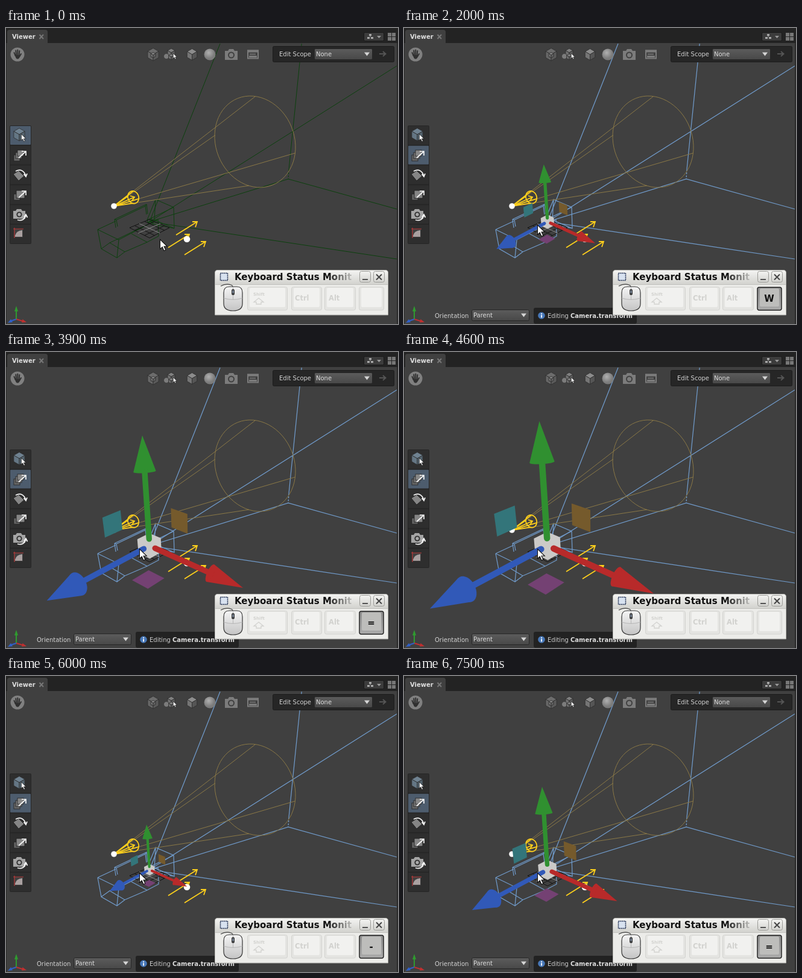
These frames come from a looping animation (650x492 px, 8 s). An HTML page:

```html
<!DOCTYPE html>
<html>
<head>
<meta charset="utf-8">
<style>
html, body { margin: 0; width: 100%; height: 100%; overflow: hidden; background: #404040; }
svg { display: block; width: 650px; height: 492px; font: 10px "DejaVu Sans", sans-serif; }
.b { font-weight: bold; }
</style>
</head>
<body>
<svg id="stage" viewBox="0 0 650 492"></svg>
<script>
const LOOP = 8000;
const f1 = v => v.toFixed(2);
const line = (pts, extra = '') => `<path d="M${pts}" fill="none" ${extra}/>`;
const shape = (pts, fill, extra = '') => `<path d="M${pts}Z" fill="${fill}" ${extra}/>`;
const rect = (x, y, w, h, fill, rx = 0, extra = '') =>
  `<rect x="${x}" y="${y}" width="${w}" height="${h}" rx="${rx}" fill="${fill}" ${extra}/>`;
const text = (x, y, s, fill, extra = '') => `<text x="${x}" y="${y}" fill="${fill}" ${extra}>${s}</text>`;
const disc = (x, y, r, fill, extra = '') => `<circle cx="${x}" cy="${y}" r="${r}" fill="${fill}" ${extra}/>`;
const grad = (id, a, b) =>
  `<linearGradient id="${id}" x2="0" y2="1"><stop stop-color="${a}"/><stop offset="1" stop-color="${b}"/></linearGradient>`;
const at = (x, y, s) => `<g transform="translate(${x} ${y})">${s}</g>`;
const pointer = '<path d="M.5 .5V16.5L4.2 13L7 19.3L9.8 18L7 12H12.3Z" fill="#fff" stroke="#111" stroke-width="1.1"/>';

function cube(x, y, r, top, left, right) {
  const w = r * .87, h = r / 2, k = 'stroke="#2c2c2c" stroke-width=".8"';
  return at(x, y,
    shape(`0 ${-r}L${w} ${-h}L0 0L${-w} ${-h}`, top, k) +
    shape(`${-w} ${-h}L0 0V${r}L${-w} ${h}`, left, k) +
    shape(`${w} ${-h}L0 0V${r}L${w} ${h}`, right, k));
}

// ---- scene ----
function room() {
  return line('238 322L355 26M238 322L648 63M238 322L648 384M238 322L468 251L648 301M490.200 26L469 235') +
    line('469 235L468 251', 'stroke-dasharray="3 2"') +
    // body
    line('152 335L158 367L184 382L197 372L172 357L158 367M152 335L187 352L184 382M152 335L182 321' +
      'M187 352L252 318L253 346L234 356L197 372M172 357L228 330M234 356L208 342') +
    // handle
    line('180 318L233 293L235 309M180 318L182 332M183 319L231 296L233 310M183 319L185 330M180 318L183 319M233 293L231 296') +
    // hood
    line('248 285L278 298L279 333L246 319ZM248 285L234 319M278 298L241 316M279 333L244 326M246 319L235 323M234 319L241 316L244 326L235 323Z');
}

function grid() {
  let d = '';
  for (let i = 0; i <= 4; i++) {
    const k = i / 4;
    if (i === 2) continue;
    d += `M${205 + 33 * k} ${332 - 14 * k}L${238 + 33 * k} ${349 - 17 * k}`;
    d += `M${205 + 33 * k} ${332 + 17 * k}L${238 + 33 * k} ${318 + 14 * k}`;
  }
  return line(d.slice(1), 'stroke="#111" stroke-width="1"') +
    line('221 325L255 341M219 341L256 325', 'stroke="#8a8a8a" stroke-width="1"');
}

const disk = '<ellipse rx="77.6" ry="65.2" transform="translate(234 -107) rotate(68.3)" fill="none" vector-effect="non-scaling-stroke"/>';
const rays = 'M0 0L234 -182M0 0L168 -118M0 0L300 -88M0 0L224 -34';
const cone = (k, style) => `<g transform="translate(179 296) scale(${k})" ${style}>${disk}` +
  `<path d="${rays}" vector-effect="non-scaling-stroke"/></g>`;

function lights() {
  const y = 'stroke="#ffcf1c" stroke-width="1.8"';
  const ray = (x, y2) => `M${x} ${y2}l35 -22m-8 0h8l-3 9`;
  return cone(1, 'stroke="#8a7846" stroke-width="1"') + cone(.137, y) +
    line('179 296L213 281M206 279L213 281L209 287', y) +
    disc(179, 296, 4.8, '#fff') +
    line((ray(282, 344) + ray(269, 365) + ray(296, 377)).slice(1), y) +
    disc(300, 351, 5.3, '#fff');
}

// ---- transform handles, in perspective ----
const AXES = [[14.42, 6.51, .01806], [-1.156, -17.64, .0148], [-14.965, 8.01, .02326]];
function project(v) {
  const sum = i => AXES.reduce((s, a, n) => s + a[i] * v[n], 0);
  const w = 1 - sum(2);
  return [238 + sum(0) / w, 322 + sum(1) / w];
}
const poly = (t, pts, fill) =>
  shape(pts.map(p => project(p.map(c => c * t)).map(f1).join(' ')).join('L'), fill);

function plane(t, skip, fill) {
  const a = .28, b = .455;
  const pts = [[a, a], [a, b], [b, b], [b, a]].map(p => { const q = [...p]; q.splice(skip, 0, 0); return q; });
  return poly(t, pts, fill);
}

function arrow(t, axis, fill, neck, radius, squash) {
  const on = k => project([0, 1, 2].map(i => i === axis ? k * t : 0));
  const tip = on(1), base = on(neck), start = on(.07);
  const dx = tip[0] - base[0], dy = tip[1] - base[1];
  const len = Math.hypot(dx, dy), r = radius * t, m = r * squash;
  const a = len - m * m / len, h = r * Math.sqrt(1 - m * m / len / len);
  return line(`${start.map(f1)}L${base.map(f1)}`, `stroke="${fill}" stroke-width="${f1(t * 1.05)}" stroke-linecap="round"`) +
    `<g fill="${fill}" transform="translate(${tip.map(f1)}) rotate(${f1(Math.atan2(dy, dx) * 180 / Math.PI)})">` +
    `<path d="M0 0L${f1(-a)} ${f1(h)}V${f1(-h)}Z"/><ellipse cx="${f1(-len)}" rx="${f1(m)}" ry="${f1(r)}"/></g>`;
}

function handles(t) {
  const c = .073;
  const hex = [[-c, c, -c], [c, c, -c], [c, -c, -c], [c, -c, c], [-c, -c, c], [-c, c, c]];
  return plane(t, 0, '#33757a') + plane(t, 2, '#755a2c') + plane(t, 1, '#744173') +
    poly(t, hex, '#cbcac8') +
    arrow(t, 1, '#309030', .705, 2.07, .15) +
    arrow(t, 0, '#b82a2a', .69, 1.75, .35) +
    arrow(t, 2, '#3159b8', .745, 2.3, .66);
}

// ---- interface ----
function header() {
  return rect(0, 0, 650, 25, '#232323') + rect(0, 25, 1, 467, '#2a2a2a') + rect(648, 25, 2, 467, '#2a2a2a') +
    shape('2 26V7Q2 3 6 3H65Q69 3 69 7V26', '#404040') +
    text(10, 18, 'Viewer', '#dedede', 'class="b"') +
    line('55.500 11L62 18M62 11L55.500 18', 'stroke="#777" stroke-width="2"') +
    rect(593.5, 7.5, 33, 14, '#3c3c3c', 2, 'stroke="#191919"') +
    rect(602, 10, 4, 3, '#aaa') + rect(599, 15, 4, 3, '#aaa') + rect(605, 15, 4, 3, '#aaa') +
    line('604 13V15', 'stroke="#aaa"') + shape('615 13H622L618.500 17', '#999') +
    [633, 640].map(x => rect(x, 8, 6, 6, '#777') + rect(x, 15, 6, 6, '#777')).join('');
}

function topIcons() {
  const g = '#7c7c7c', d = '#404040';
  const finger = (x, y, x2) => `M${x} ${y}L${x2} 46`;
  return disc(19, 44, 11.5, '#808080') +
    line((finger(13.5, 41, 15.5) + finger(16.3, 37.5, 17) + finger(19.3, 36.5, 19.3) + finger(22.3, 38, 21.6) + 'M25 43L22 48').slice(1),
      'stroke="#303030" stroke-width="2" stroke-linecap="round"') +
    shape('14.500 45H23L22 50Q19 53 16.500 50', '#303030') +
    cube(244, 44, 10.5, '#6c6c6c', '#666', '#5a5a5a') + rect(240, 42, 7, 7, '#464646') + cube(244, 45, 4.5, '#858585', '#777', '#666') +
    cube(274, 41, 7, '#808080', '#707070', '#5c5c5c') + disc(266, 47, 4.5, g, `stroke="${d}"`) + cube(274, 48, 5, '#808080', '#707070', '#606060') +
    at(277, 42, `<g transform="scale(.52)">${pointer}</g>`) +
    cube(308.500, 44, 9.5, '#8c8c8c', '#757575', '#555') +
    disc(338, 44, 9.5, 'url(#ball)') +
    shape('363 38H368L370 35H377L379 38H384V53H363', g) + disc(373.500, 45, 5.5, d) + disc(373.500, 45, 3.5, g) +
    rect(401, 37.5, 17, 13, d, 0, `stroke="${g}" stroke-width="2"`) + rect(400, 36.5, 19, 4, g) +
    rect(403, 46, 13, 3, g) + line('404 43.500H414', `stroke="${g}" stroke-width="1.5"`) +
    rect(442.5, 30.5, 201, 26, '#262626', 2, 'stroke="#1c1c1c"') +
    text(453, 47, 'Edit Scope', '#d2d2d2') + combo(511, 34, 97, 'None') +
    line('619 43H629M625 39L629.500 43L625 47', 'stroke="#555" stroke-width="2"');
}

function combo(x, y, w, label) {
  return rect(x + .5, y + .5, w - 1, 18, 'url(#combo)', 2, 'stroke="#272727"') +
    text(x + 3, y + 13, label, '#dedede') + shape(`${x + w - 14} ${y + 6.5}h9l-4.500 6`, '#d5d5d5');
}

function tools(active) {
  let s = rect(6, 162, 36, 197, '#262626', 2);
  for (let i = 0; i < 6; i++) s += rect(7, 163 + 32.8 * i, 34, 31, i === active ? '#4d5c6d' : '#2e2e2e', 1);
  const box = (x, y, c) => rect(x, y, 10, 10, c, 0, 'stroke="#222" stroke-width=".8"');
  const dart = (x, y) => line(`${x} ${y}l12 -11m-7 0h7v7`, 'stroke="#f5f5f5" stroke-width="1.7"');
  const curve = d => line(d, 'stroke="#f5f5f5" stroke-width="1.8"');
  return s +
    cube(22, 177, 10.5, '#6f8291', '#647684', '#55646f') + at(25, 176, `<g transform="scale(.66)">${pointer}</g>`) +
    box(13, 211, '#666') + box(16, 207, '#777') + box(19, 203, '#888') + dart(21, 216) +
    shape('12 243L21 237L30 246L21 254', '#858585', 'stroke="#222"') + curve('16 238Q28 232 33 246M29.500 243L33 247L35 242') +
    box(13, 276, '#666') + rect(17, 270, 14, 13, '#858585', 0, 'stroke="#222"') + dart(21, 282) +
    shape('12 304H16L18 301H25L27 304H32V317H12', '#a5a5a5') + disc(22, 310, 4.6, '#2e2e2e') + disc(22, 310, 2.7, '#aaa') +
    curve('19 319Q30 322 33 311M30 314L33 310L35.500 315') +
    rect(14, 334, 14, 14, '#3f3f3f') + shape('15 347V345Q17 337 27 336V347', '#a9a0a0') +
    line('12 334H29M14 332V349', 'stroke="#b83a3a" stroke-width="1.2"');
}

function compass() {
  return line('17 484V470', 'stroke="#2f9a2f" stroke-width="2"') + line('17 484L27 487', 'stroke="#c03030" stroke-width="2"') +
    line('17 484L8 487', 'stroke="#3060c8" stroke-width="2"') +
    shape('17 462L20 471H14', '#2f9a2f') + shape('34 489L26 489.500L27.500 484', '#c03030') + shape('3 490L8 484L11 489', '#3060c8');
}

function status() {
  return text(51, 482, 'Orientation', '#d2d2d2') + combo(112, 468, 96, 'Parent') +
    rect(215, 465, 171, 26.500, '#222', 3) +
    disc(228, 478, 5.8, '#4878b8') + rect(227.2, 477, 1.8, 4.500, '#fff') + rect(227.2, 474.200, 1.8, 1.8, '#fff') +
    text(238, 482, 'Editing', '#ccc') + text(276, 482, 'Camera.transform', '#ddd', 'class="b"');
}

function monitor() {
  const key = (x, w) => rect(x + .5, 430.5, w, 38.5, '#e4e4e1', 3, 'stroke="#d3d3d0"') + rect(x + 4, 432, w - 7, 32, '#f1f1ef', 2);
  const btn = x => rect(x + .5, 404.5, 18, 18, 'url(#bar)', 3, 'stroke="#9a9a96"');
  const pale = '#d2d2cf';
  return shape('346.500 477V407Q346.500 402.500 351 402.500H629Q633.500 402.500 633.500 407V477', '#ecece9', 'stroke="#b5b5b1"') +
    shape('347 426V407Q347 403 351 403H629Q633 403 633 407V426', 'url(#bar)') + rect(347, 426, 286, 1, '#c2c2be') +
    rect(355.5, 407.5, 12, 12, '#d8e2f0', 0, 'stroke="#16264a" stroke-width="1.5" stroke-dasharray="2 1"') +
    text(379, 419, 'Keyboard Status Monit', 'url(#fade)', 'class="b" font-size="15"') +
    btn(586) + btn(609) + line('591 418H600', 'stroke="#444" stroke-width="1.8"') +
    line('614 409.500L623 418.500M623 409.500L614 418.500', 'stroke="#444" stroke-width="2"') +
    key(400, 66) + key(473, 50) + key(528, 51) + key(585, 41) +
    text(410, 445, 'Shift', pale, 'class="b" font-size="7"') +
    line('419 449L427 455.500H423V459H415V455.500H411Z', `stroke="${pale}" stroke-width="1.3"`) +
    text(479, 453, 'Ctrl', pale, 'class="b" font-size="11.500"') + text(535, 453, 'Alt', pale, 'class="b" font-size="11.500"');
}

const mouseBody = '361 440Q361 430 370 430H383Q392 430 392 440V458Q392 470 376.500 470Q361 470 361 458';
function mouse(down) {
  return line('356 429Q365 424 373 427Q376 428 376.500 431', 'stroke="#444" stroke-width="1.3"') +
    shape(mouseBody, 'url(#shell)', 'stroke="#333" stroke-width="1.2"') +
    (down ? shape('362 440Q362 431 370 431H376V451H362', '#555') + shape('362 451H376V467Q362 466 362 456', '#aaa') : '') +
    line('361 449Q376 454 392 449M376.500 430V451', 'stroke="#b5b5b5" stroke-width="1"') +
    rect(374, 434, 5, 10, '#3a3a3a', 2.5) + rect(375.5, 436, 2, 5, '#8a9ab0', 1);
}

function pressed(label) {
  return label && rect(586, 431, 40, 38, 'url(#down)', 3, 'stroke="#222" stroke-width="1.4"') +
    rect(590, 433, 32, 30, '#bdbdbb', 2) +
    text(605.5, 455, label, '#111', 'class="b" font-size="15" text-anchor="middle"');
}

// ---- timeline: [start, value] ----
const SIZES = [[0, 0], [2000, 5], [3300, 6], [3500, 7], [3700, 8], [3900, 9], [4100, 10], [5000, 9], [5300, 8],
  [5400, 7], [5600, 6], [5800, 5], [6000, 4], [6300, 3], [6900, 4], [7100, 5], [7300, 6], [7500, 7]];
const KEYS = [[0, ''], [2000, 'W'], [2500, ''], [3200, '='], [4600, ''], [5000, '-'], [6800, '=']];
const MOVES = [[0, 0], [400, .3], [500, .75], [600, 1]];
const pick = (track, t) => track.reduce((v, [start, next]) => t >= start ? next : v, track[0][1]);

const stage = document.getElementById('stage');
const layer = id => `<g id="${id}"></g>`;
stage.innerHTML = '<defs>' + grad('bar', '#f4f4f2', '#d2d2ce') + grad('combo', '#5c5c5c', '#484848') +
  grad('down', '#8c8c8c', '#aaa') + grad('shell', '#f5f5f5', '#c4c4c4') +
  '<radialGradient id="ball" cx=".4" cy=".35"><stop stop-color="#b0b0b0"/><stop offset="1" stop-color="#7c7c7c"/></radialGradient>' +
  '<linearGradient id="fade" gradientUnits="userSpaceOnUse" x1="535" x2="575" y1="0" y2="0">' +
  '<stop stop-color="#111"/><stop offset="1" stop-color="#c8c8c5"/></linearGradient></defs>' +
  rect(0, 0, 650, 492, '#404040') + `<g id="wires">${room()}</g>` + grid() + lights() + layer('gizmo') +
  header() + topIcons() + layer('tools') + compass() + layer('status') + monitor() + layer('mouse') + layer('key') +
  `<g id="cursor">${pointer}</g>`;

const el = id => document.getElementById(id);
const last = {};
function put(id, state, draw) {
  if (last[id] === state) return;
  last[id] = state;
  el(id).innerHTML = draw(state);
}

function render(t) {
  const size = pick(SIZES, t), move = pick(MOVES, t), chosen = t >= 900;
  put('gizmo', size, s => s ? handles(s) : '');
  put('tools', size ? 1 : 0, tools);
  put('status', size > 0, on => on ? status() : '');
  put('mouse', t >= 800 && t < 1100, mouse);
  put('key', pick(KEYS, t), pressed);
  el('wires').setAttribute('stroke', chosen ? '#709bcb' : '#0b400d');
  el('wires').setAttribute('stroke-width', chosen ? 1.25 : 1);
  el('cursor').setAttribute('transform', `translate(${255 - 34 * move} ${351 - 24 * move})`);
}

const begin = performance.now();
function tick() {
  render((performance.now() - begin) % LOOP);
  requestAnimationFrame(tick);
}
tick();
</script>
</body>
</html>
```
